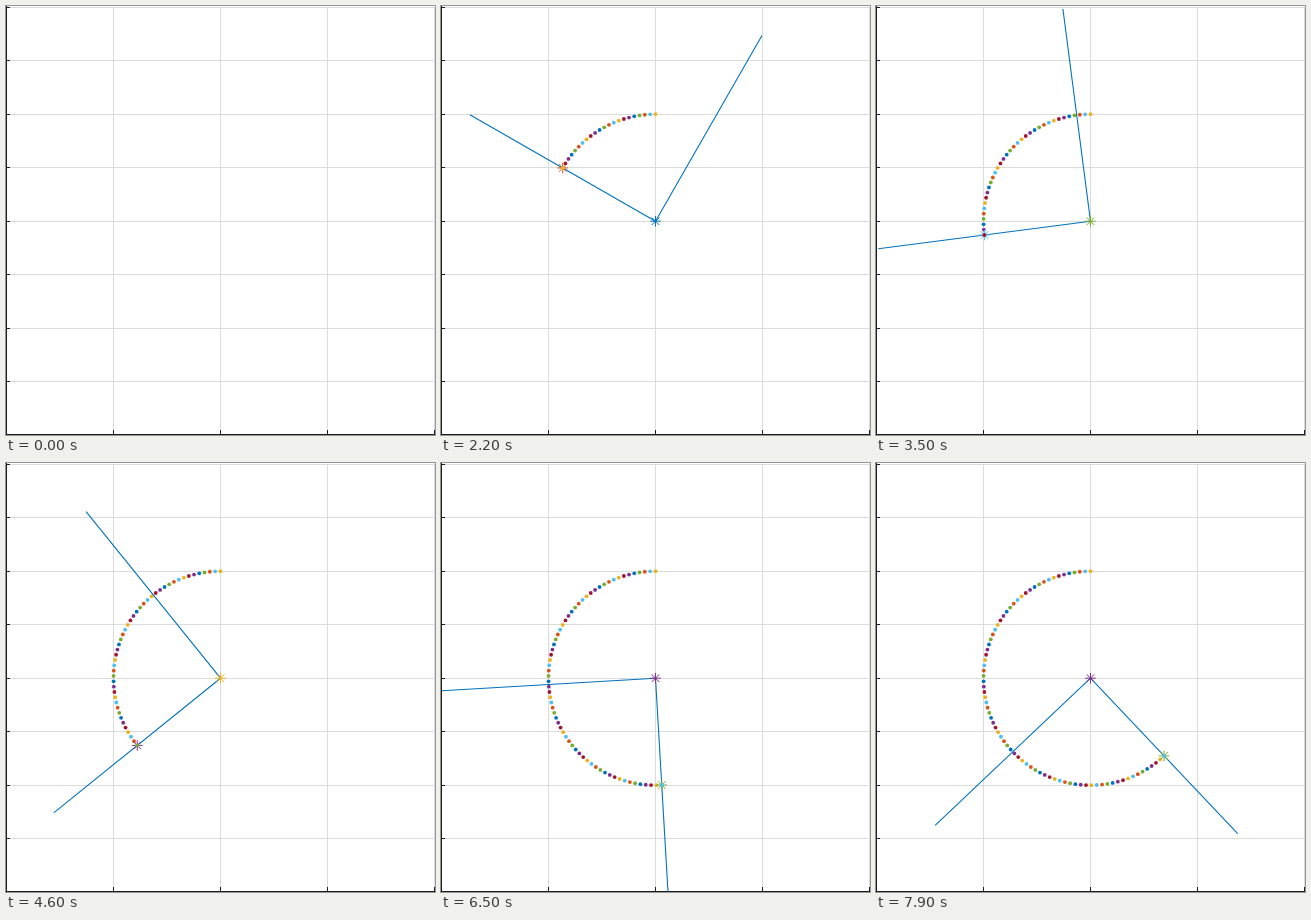
Recreate the animation shown at these times as an HTML page. Size 429 by 429 pixels, loop 8000 ms.

```html
<!DOCTYPE html>
<html lang="en">
<head>
<meta charset="utf-8">
<title>Rotating axes</title>
<style>
  html, body { margin: 0; width: 100%; height: 100%; overflow: hidden; background: #fff; }
  svg { display: block; width: 100vw; height: 100vh; }
  #grid, #axes { shape-rendering: crispEdges; }
  #grid { stroke: #dbdbdb; }
  #axes { stroke: #1c1c1c; }
  path { fill: none; stroke-width: 1; }
  #arms { stroke: #0072bd; stroke-width: 1.1; stroke-linejoin: round; }
</style>
</head>
<body>
<svg viewBox="0 0 429 429">
  <path id="grid"/>
  <path id="axes"/>
  <g id="trail"></g>
  <g id="pose">
    <path id="arms"/>
    <path id="hub" class="star"/>
    <path id="tip" class="star"/>
    <circle id="head" r="1.9"/>
  </g>
</svg>
<script>
const COLORS = ['#0072bd', '#d95319', '#edb120', '#7e2f8e', '#77ac30', '#4dbeee', '#a2142f'];
const CX = 214.5, CY = 215.2, UNIT = 107;
const STEP_MS = 100, STEPS = 80, STEP_ANGLE = 0.05;

const $ = id => document.getElementById(id);
const set = (el, attrs) => {
  for (const name in attrs) el.setAttribute(name, attrs[name]);
  return el;
};
const color = i => COLORS[i % COLORS.length];

// Point at a distance from the hub, angle counted anticlockwise from straight up.
const polar = (angle, radius) => [CX - radius * Math.sin(angle), CY - radius * Math.cos(angle)];

function drawFrame() {
  let grid = '', axes = 'M.5 0V429M0 428.5H429';
  for (let i = 1; i <= 4; i++) {
    const x = i * UNIT + 0.5;
    grid += `M${x} 1V428`;
    axes += `M${x} 424V429`;
  }
  for (let i = 0; i < 8; i++) {
    const y = Math.round(0.8 + i * UNIT / 2) + 0.5;
    grid += `M1 ${y}H429`;
    axes += `M0 ${y}H4`;
  }
  set($('grid'), { d: grid });
  set($('axes'), { d: axes });
}

const dots = Array.from({ length: STEPS - 1 }, (_, k) => {
  const [cx, cy] = polar(k * STEP_ANGLE, UNIT);
  const dot = document.createElementNS('http://www.w3.org/2000/svg', 'circle');
  return $('trail').appendChild(set(dot, { cx, cy, r: 1.9, fill: color(3 * k + 2) }));
});

function placeStar(el, [x, y], stroke) {
  set(el, {
    d: 'M-5.3 0H5.3M0-5.3V5.3M-3.8-3.8L3.8 3.8M-3.8 3.8L3.8-3.8',
    transform: `translate(${x} ${y})`,
    stroke
  });
}

function render(ms) {
  const k = Math.floor(ms / STEP_MS) % STEPS - 1;
  $('pose').style.display = k < 0 ? 'none' : '';
  dots.forEach((dot, i) => { dot.style.display = i < k ? '' : 'none'; });
  if (k < 0) return;

  const angle = k * STEP_ANGLE;
  const tip = polar(angle, UNIT);
  const long = polar(angle, 2 * UNIT), side = polar(angle - Math.PI / 2, 2 * UNIT);
  set($('arms'), { d: `M${long}L${CX} ${CY}L${side}` });
  placeStar($('hub'), [CX, CY], color(3 * k));
  placeStar($('tip'), tip, color(3 * k + 1));
  set($('head'), { cx: tip[0], cy: tip[1], fill: color(3 * k + 2) });
}

drawFrame();
const start = performance.now();
function tick() {
  render(performance.now() - start);
  requestAnimationFrame(tick);
}
tick();
</script>
</body>
</html>
```
